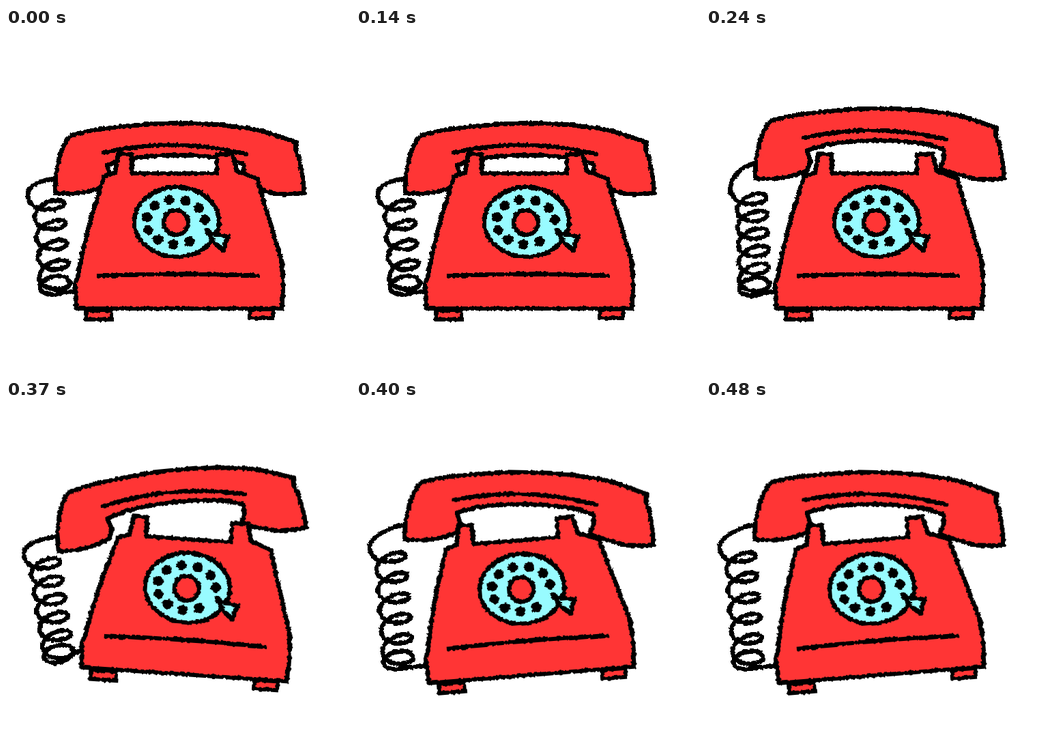
Write an HTML page that moves like this. It is 504 px wide and 504 px high and loops after 0.53 s.

```html
<!DOCTYPE html>
<html lang="en">
<head>
<meta charset="utf-8">
<title>Ringing telephone</title>
<style>
  html, body { margin: 0; width: 100%; height: 100%; overflow: hidden; background: #fff; }
  svg { display: block; width: 100vw; height: 100vh; }
  .ink { fill: none; stroke: #000; stroke-width: 6.6; stroke-linecap: round; stroke-linejoin: round; }
  .red { fill: #ff3535; }
  .blue { fill: #98fbff; }
  #holes { fill: #000; stroke: none; }
</style>
</head>
<body>
<svg viewBox="0 0 504 504" shape-rendering="crispEdges">
  <filter id="rough" filterUnits="userSpaceOnUse" x="-40" y="-40" width="584" height="584" color-interpolation-filters="sRGB">
    <feTurbulence type="fractalNoise" baseFrequency=".2" numOctaves="2" seed="4"/>
    <feDisplacementMap in="SourceGraphic" scale="5" xChannelSelector="R" yChannelSelector="G"/>
  </filter>

  <g filter="url(#rough)"><path id="cord" class="ink"/></g>

  <!-- The handset turns around the middle of its lower edge. -->
  <g id="handset"><g class="ink" filter="url(#rough)" transform="translate(-253.5 -220.5)">
    <path class="red" d="M93 138Q105 129 190 121Q285 112 375 129L425 146L424 155Q434 180 437 220
      Q400 224 385 219L343 207Q351 192 348 178C310 160 190 160 148 180L153 195L148 209
      Q110 225 72 220Q72 165 93 138Z"/>
    <path d="M143 161Q245 138 352 163"/>
  </g></g>

  <!-- The body turns around the middle of its crease. -->
  <g id="body"><g class="ink" filter="url(#rough)" transform="translate(-253 -363)">
    <path class="red" d="M117 414v13h38v-13ZM357 412v13h34v-13Z"/>
    <path class="red" d="M103 411L101 374L105 366Q113 310 144 217L160 212L164 185H184L185 213H309
      V185H332L338 209L368 221L398 322Q410 350 404 411Z"/>
    <path d="M136 363Q253 358 370 363"/>
    <ellipse class="blue" cx="250" cy="284" rx="62" ry="51"/>
    <path class="blue" d="M294 296L306 303L325 305L318 326L304 313Z"/>
    <circle class="red" cx="249" cy="285" r="18"/>
    <g id="holes"></g>
  </g></g>
</svg>
<script>
const byId = id => document.getElementById(id);
const TURN = 2 * Math.PI;

// Ten finger holes around the dial, leaving a gap at the pointer
byId("holes").innerHTML = Array.from({ length: 10 }, (_, i) => {
  const angle = TURN * (62 + 32.5 * i) / 360;
  return `<circle cx="${248.5 + 43 * Math.cos(angle)}" cy="${284 + 33 * Math.sin(angle)}" r="7.5"/>`;
}).join("");

// Each pose is held until its time; the coil runs from the centre of its first loop to its last.
const poses = [
  { until: 240, body: { x: 253, y: 363, tilt: 0 }, handset: { x: 253.5, y: 242, tilt: 0 },
    coil: { from: [63, 260], to: [72, 377], loops: 5 } },
  { until: 320, body: { x: 253, y: 363, tilt: 0 }, handset: { x: 253.5, y: 220.5, tilt: 0 },
    coil: { from: [67, 251], to: [71, 379], loops: 6 } },
  { until: 400, body: { x: 263.5, y: 354, tilt: 3.9 }, handset: { x: 257.5, y: 204.5, tilt: -5.5 },
    coil: { from: [57, 240], to: [77, 372], loops: 6 } },
  { until: 530, body: { x: 252.5, y: 355, tilt: -4.6 }, handset: { x: 252.5, y: 208.5, tilt: 1.3 },
    coil: { from: [51, 231], to: [62, 381], loops: 6 } },
];

// Stage position of a point fixed to a tilted part
function attached(part, x, y) {
  const angle = TURN * part.tilt / 360, c = Math.cos(angle), s = Math.sin(angle);
  return [part.x + x * c - y * s, part.y + x * s + y * c];
}

function coilPoint({ from, to, loops }, turn) {
  const drift = Math.min(1, turn / (loops - 1));
  const c = Math.cos(TURN * turn), s = Math.sin(TURN * turn);
  return [from[0] + (to[0] - from[0]) * drift + 22 * c,
          from[1] + (to[1] - from[1]) * drift - 13 * s - 3 * c];
}

// The cord swings out from the handset, coils downwards and ends behind the body.
function cordPath({ body, handset, coil }) {
  const [x, y] = attached(handset, -180, -22);
  const bendX = coil.from[0] - 31, bendY = coil.from[1] - 15;
  const points = [];
  for (let turn = -0.25; turn < coil.loops - 0.2; turn += 1 / 32) points.push(coilPoint(coil, turn));
  const [startX, startY] = points[0];
  return `M${x} ${y}C${x - 25} ${y + 4} ${bendX} ${bendY - 15} ${bendX} ${bendY}`
    + `S${startX - 14} ${startY + 2} ${points.join("L")}L${attached(body, -151, 22)}`;
}

function place(id, { x, y, tilt }) {
  byId(id).setAttribute("transform", `translate(${x} ${y}) rotate(${tilt})`);
}

let shown;
function draw() {
  const time = performance.now() % 530;
  const pose = poses.find(p => time < p.until);
  if (pose !== shown) {
    shown = pose;
    place("body", pose.body);
    place("handset", pose.handset);
    byId("cord").setAttribute("d", cordPath(pose));
  }
  requestAnimationFrame(draw);
}
draw();
</script>
</body>
</html>
```
